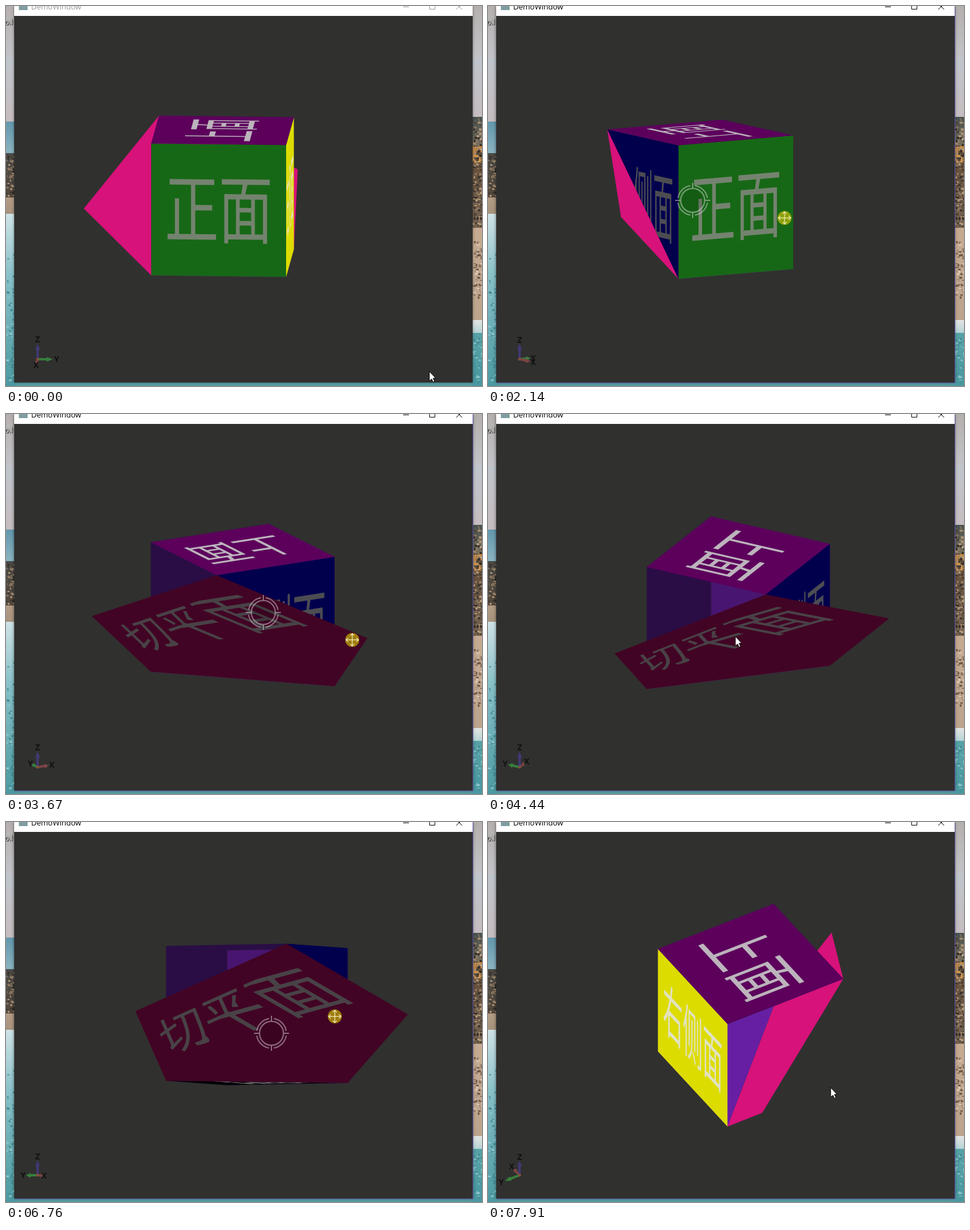
Animation, 814 px wide and 651 px high, one loop 7.99 s. Source, as an HTML page with a canvas:

```html
<!DOCTYPE html>
<html lang="zh-CN">
<head>
<meta charset="utf-8">
<title>DemoWindow</title>
<style>
  html, body { margin: 0; width: 100%; height: 100%; overflow: hidden; }
  #stage { position: absolute; left: 0; top: 0; width: 814px; height: 651px; overflow: hidden; background: #569fa4; }
  #stage > *, #bar > * { position: absolute; }
  canvas { left: 0; top: 0; }
  #label { left: -2px; top: 19px; font: 12px "Open Sans", sans-serif; color: #fff; text-shadow: 1px 1px 1px #000, 0 0 2px #000; }
  #win { left: 14px; top: 0; width: 784px; height: 645px; background: #30302f; box-shadow: 0 0 4px rgba(0,0,0,.5); color: #999; }
  #win.on { color: #000; box-shadow: 1px 1px 0 #5d55a8, 0 0 5px rgba(0,0,0,.55); }
  #bar { position: absolute; width: 784px; height: 17px; background: #fff; overflow: hidden; }
  #icon { left: 8px; top: -8px; width: 15px; height: 15px; background: #7f9da0; }
  #name { left: 29px; top: -8px; font: 13px/18px "Open Sans", sans-serif; }
  #bar svg { left: 664px; top: 0; fill: none; stroke: currentColor; }
</style>
</head>
<body>
<div id="stage">
  <canvas id="shore" width="814" height="651"></canvas>
  <div id="label">o.l</div>
  <div id="win">
    <div id="bar">
      <div id="icon"></div>
      <div id="name">DemoWindow</div>
      <svg width="110" height="17"><path d="M1 1.5h10M46.500 -4v9.500h9v-9.500M92 -4l10 10M102 -4l-10 10"/></svg>
    </div>
  </div>
  <canvas id="view" width="814" height="651"></canvas>
</div>
<script>
const LOOP = 7990, SIZE = 231, RAD = Math.PI / 180;
const VIEW = { x: 406, y: 331 };          // every turn is about the middle of the window
const CUBE = [-.0955, -.16, 0];           // cube centre, seen from that middle
const ctx = document.getElementById('view').getContext('2d');
const win = document.getElementById('win');

const add = (a, b) => a.map((v, i) => v + b[i]);
const sub = (a, b) => a.map((v, i) => v - b[i]);
const dot = (a, b) => a.reduce((s, v, i) => s + v * b[i], 0);
const mix = (a, b, f) => a + (b - a) * f;
const smooth = f => f * f * (3 - 2 * f);

// The pointer either glides freely or drags the scene to a new azimuth and elevation.
const glide = (from, to, x, y) => ({ from, to, x, y });
const drag = (from, to, x, y, az, el, pivot) => ({ from, to, x, y, az, el, pivot });
const START = { x: 724, y: 626, az: 3.3, el: 11.9 };
const MID = [454, 362];
const MOVES = [
  glide(70, 600, 413, 413),
  glide(750, 910, 400, 410),
  glide(1060, 1200, 350, 333),
  drag(1200, 2200, 517, 365, -34, 7.7, [350, 333]),
  drag(2200, 2850, 725, 320, -83.8, 6.5, [342, 352]),
  glide(2990, 3150, 440, 340),
  drag(3150, 4150, 732, 430, -151.6, 25.3, [440, 340]),
  glide(4150, 4440, 423, 381),
  glide(4440, 4670, 454, 361),
  drag(4840, 5070, 450, 410, -150, 28, MID),
  drag(5070, 5680, 454, 361, -157.9, 5.9, MID),
  drag(5680, 6760, 562, 333, -153, -2.2, MID),
  drag(6760, 7560, 795, 420, -211, 40.5, MID),
  glide(7560, 7910, 586, 455)
];

function stateAt(t) {
  let s = { ...START, grip: false, pivot: null };
  for (const m of MOVES) {
    if (t < m.from) break;
    const f = Math.min(1, (t - m.from) / (m.to - m.from)), e = m.pivot ? f : smooth(f);
    s.x = mix(s.x, m.x, e);
    s.y = mix(s.y, m.y, e);
    s.grip = !!m.pivot && t < m.to;
    if (!m.pivot) continue;
    s.az = mix(s.az, m.az, e);
    s.el = mix(s.el, m.el, e);
    s.pivot = t < m.to + 120 ? m.pivot : null;
  }
  return s;
}

// corners named after the cut plane x + y + z = 1
const P = [0, 0, 1], C = [1, 0, 0], D = [0, 1, 0], A = [-.5, 1, .5], B = [1, -.5, .5];
const FAR = [1, 1, 1], BASE = [1, 1, 0], TOP_L = [1, 0, 1], TOP_R = [0, 1, 1];

// box of a caption: origin, right, down
const FACES = [
  { n: C, pts: [C, BASE, FAR, TOP_L], out: '#176816', ink: '#74836f', inside: '#481570',
    text: '正面', box: [TOP_L, [0, 1, 0], [0, 0, -1]] },
  { n: D, pts: [D, BASE, FAR, TOP_R], out: '#dcdc00', ink: '#e2e2c4', inside: '#2a0d45',
    text: '右侧面', box: [FAR, [-1, 0, 0], [0, 0, -1]] },
  { n: [0, -1, 0], pts: [P, TOP_L, C], out: '#00004d', ink: '#4c4c52', inside: '#321255',
    text: '左侧面', box: [P, [1, 0, 0], [0, 0, -1]] },
  { n: P, pts: [P, TOP_L, FAR, TOP_R], out: '#5c005c', ink: '#bcb4bc', inside: '#2a0d45',
    text: '上面', box: [TOP_L, [-1, 0, 0], [0, 1, 0]] },
  { n: [0, 0, -1], pts: [C, BASE, D], out: '#000', ink: '#aaa', inside: '#661fa3',
    text: '下面', box: [D, [1, 0, 0], [0, -1, 0]] }
];

function makeCamera(az, el) {
  const s = Math.sin(az * RAD), c = Math.cos(az * RAD), se = Math.sin(el * RAD), ce = Math.cos(el * RAD);
  const dir = v => [c * v[1] - s * v[0], se * (c * v[0] + s * v[1]) - ce * v[2]];
  return {
    dir,
    eye: [c * ce, s * ce, se],
    point: v => {
      const [x, y] = dir(add(sub(v, [.5, .5, .5]), CUBE));
      return [VIEW.x + SIZE * x, VIEW.y + SIZE * y];
    }
  };
}

function trace(pts) {
  ctx.beginPath();
  pts.forEach(p => ctx.lineTo(...p));
  ctx.closePath();
}

function disc(x, y, r, color) {
  ctx.fillStyle = color;
  ctx.beginPath();
  ctx.arc(x, y, r, 0, 7);
  ctx.fill();
}

function fillShape(cam, pts, color) {
  trace(pts.map(cam.point));
  ctx.fillStyle = color;
  ctx.fill();
}

// Lays a caption over the square spanned by right and down, clipped to a shape.
function caption(cam, clip, [origin, right, down], text, color) {
  const [ox, oy] = cam.point(origin), [rx, ry] = cam.dir(right), [dx, dy] = cam.dir(down);
  ctx.save();
  trace(clip.map(cam.point));
  ctx.clip();
  ctx.transform(rx * SIZE, ry * SIZE, dx * SIZE, dy * SIZE, ox, oy);
  ctx.translate(.5, .5);
  ctx.scale(.0006 + .0068 / text.length, .0057);
  ctx.font = '100px "Noto Sans CJK SC", "Noto Sans CJK", sans-serif';
  ctx.textAlign = 'center';
  ctx.fillStyle = color;
  ctx.fillText(text, 0, 36);
  ctx.restore();
}

function drawPlane(cam, front) {
  fillShape(cam, [A, P, B, C, D], front ? '#d7127a' : '#420424');
  if (front) return;
  // the caption bends along the diagonal P-D
  caption(cam, [A, P, D], [A, sub(P, A), sub(D, A)], '切平面', '#484246');
  caption(cam, [P, B, D], [sub(add(P, D), B), sub(B, D), sub(B, P)], '切平面', '#484246');
}

function drawSolid(cam) {
  const planeFront = dot(cam.eye, FAR) > 0;
  const facing = f => dot(f.n, cam.eye) > 0;
  if (planeFront) drawPlane(cam, true);
  FACES.filter(f => !facing(f)).forEach(f => fillShape(cam, f.pts, f.inside));
  FACES.filter(facing).forEach(f => {
    fillShape(cam, f.pts, f.out);
    caption(cam, f.pts, f.box, f.text, f.ink);
  });
  if (!planeFront) drawPlane(cam, false);
}

function drawAxes(cam) {
  const ox = 54, oy = 605;
  const axes = [['X', C, '#7c4444'], ['Y', D, '#37803d'], ['Z', P, '#3f3a75']]
    .map(([name, v, color]) => ({ name, color, v, depth: dot(v, cam.eye) }))
    .sort((a, b) => a.depth - b.depth);
  ctx.font = 'bold 14px "Open Sans", sans-serif';
  ctx.textAlign = 'center';
  axes.forEach(a => {
    const [x, y] = cam.dir(a.v), r = 32 / (1 - .32 * a.depth), len = Math.hypot(x, y) || 1;
    const at = (k, side) => [ox + x * r * k - y / len * side, oy + y * r * k + x / len * side];
    ctx.fillStyle = a.color;
    trace([at(0, -2), at(.5, -2), at(.5, 2), at(0, 2)]);
    ctx.fill();
    trace([at(.48, -4), at(.8, 0), at(.48, 4)]);
    ctx.fill();
    ctx.fillStyle = '#111';
    const [lx, ly] = at(1, 0);
    ctx.fillText(a.name, lx, ly + 5);
  });
  disc(ox, oy, 2.5, '#805038');
}

// Draws one arm four times around a point.
function fourWays(x, y, color, width, arm) {
  ctx.save();
  ctx.translate(x, y);
  ctx.strokeStyle = color;
  ctx.lineWidth = width;
  for (let i = 0; i < 4; i++) {
    ctx.beginPath();
    arm();
    ctx.stroke();
    ctx.rotate(Math.PI / 2);
  }
  ctx.restore();
}

function drawPivot(x, y) {
  disc(x, y, 18, 'rgba(0,0,0,.12)');
  fourWays(x, y, 'rgba(205,200,205,.55)', 2, () => {
    ctx.arc(0, 0, 20.5, 0, Math.PI / 2);
    ctx.moveTo(25.5 * Math.cos(.16), 25.5 * Math.sin(.16));
    ctx.arc(0, 0, 25.5, .16, Math.PI / 2 - .16);
    ctx.moveTo(21, 0);
    ctx.lineTo(30, 0);
  });
}

function drawGrip(x, y) {
  disc(x, y, 12, 'rgba(215,197,0,.62)');
  fourWays(x, y, '#f4efc0', 1.2, () => {
    ctx.moveTo(0, 0);
    ctx.lineTo(10, 0);
    ctx.moveTo(7, -3.5);
    ctx.lineTo(10.5, 0);
    ctx.lineTo(7, 3.5);
  });
}

const ARROW = new Path2D('M0 0V16.500L3.800 13 6.500 18.500 9 17.300 6.400 11.800H11Z');
function drawArrow(x, y) {
  ctx.save();
  ctx.translate(x, y);
  ctx.fillStyle = '#fff';
  ctx.strokeStyle = '#000';
  ctx.fill(ARROW);
  ctx.stroke(ARROW);
  ctx.restore();
}

function paintShore() {
  const g = document.getElementById('shore').getContext('2d');
  let seed = 7;
  const rand = () => (seed = seed * 16807 % 2147483647) / 2147483647;
  const band = (x, top, bottom, from, to) => {
    g.fillStyle = g.createLinearGradient(0, top, 0, bottom);
    g.fillStyle.addColorStop(0, from);
    g.fillStyle.addColorStop(1, to);
    g.fillRect(x, top, 16, bottom - top);
  };
  const flecks = (x, top, bottom, count, colors) => {
    for (let i = 0; i < count; i++) {
      g.fillStyle = colors[i % colors.length];
      g.fillRect(x + rand() * 15, mix(top, bottom, rand()), 1 + rand() * 4, 1 + rand() * 3);
    }
  };
  const town = ['#2f2b27', '#8a7560', '#4d443b', '#b59a7c'], foam = ['#8cc4c9', '#478f97'];

  for (const x of [0, 798]) {
    band(x, 0, 90, '#b5b0ae', '#c3c3c8');
    band(x, 90, 200, '#bfc5cc', '#c6bcbf');
  }
  band(0, 198, 252, '#6297ac', '#8bb4c1');
  band(0, 252, 328, '#4a4b49', '#54483c');
  flecks(0, 255, 326, 110, town);
  band(0, 328, 356, '#b39b85', '#a8937e');
  band(0, 356, 470, '#cfe3e6', '#84bec6');
  band(0, 470, 651, '#84bec6', '#4c9aa1');
  flecks(0, 420, 645, 80, foam);

  band(798, 190, 240, '#47504f', '#77705f');
  band(798, 240, 268, '#c4863f', '#cf9a58');
  band(798, 268, 380, '#66503c', '#75634f');
  flecks(798, 192, 378, 230, town);
  band(798, 380, 538, '#c6ab92', '#bda48d');
  flecks(798, 400, 500, 70, ['#8c7561', '#6d5948', '#d8c3ac']);
  band(798, 538, 560, '#e3e6e4', '#b5d3d5');
  band(798, 560, 651, '#57a2a7', '#4a99a0');
  flecks(798, 565, 645, 40, foam);
}

function render(t) {
  const s = stateAt(t), cam = makeCamera(s.az, s.el);
  win.className = t >= 1060 ? 'on' : '';
  ctx.clearRect(0, 0, 814, 651);
  drawSolid(cam);
  drawAxes(cam);
  if (s.pivot) drawPivot(...s.pivot);
  (s.grip ? drawGrip : drawArrow)(s.x, s.y);
}

paintShore();
const start = performance.now();
function tick() {
  render((performance.now() - start) % LOOP);
  requestAnimationFrame(tick);
}
tick();
</script>
</body>
</html>
```
